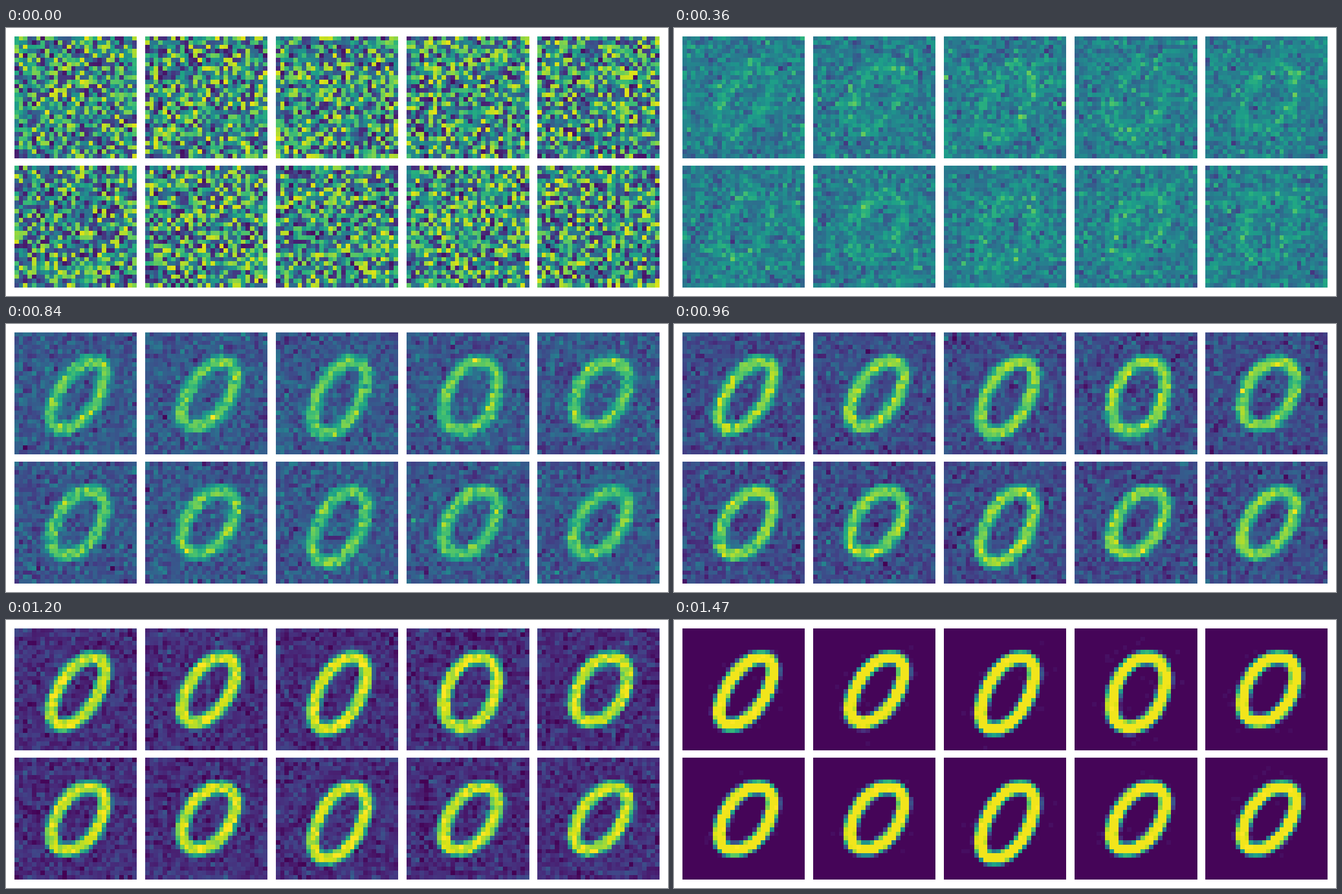
Write a matplotlib script that moves like this. It is 1175 px wide and 477 px high and loops after 1500 ms.

```python
import numpy as np
import matplotlib.pyplot as plt
from matplotlib.animation import FuncAnimation

WIDTH, HEIGHT, DPI = 1175, 477, 64
FRAMES, INTERVAL = 50, 30
COLS, ROWS, CELLS = 5, 2, 28
LEFT, TOP, PANEL = 15, 15, 217
STEP_X, STEP_Y = 232, 230
KEEP = 0.86  # share of the noise that survives one step

# Each zero is a leaning oval: (lean, lowest row), in cells.
ZEROS = [
    (3.5, 22.2), (3.2, 21.6), (3.1, 23.1), (2.0, 22.7), (2.3, 21.4),
    (2.7, 21.3), (2.6, 21.0), (3.0, 23.1), (2.8, 21.2), (3.0, 21.1),
]
CENTRE_X, HIGHEST, REACH = 14.6, 6.8, 6.0
HALF_STROKE = 1.5


def smoothstep(t):
    return t * t * (3 - 2 * t)


def oval(lean, lowest, steps=160):
    """Centre line of a sheared, slightly squarish oval."""
    angle = np.linspace(0, 2 * np.pi, steps, endpoint=False)
    across, down = (np.sign(v) * np.abs(v) ** 0.92
                    for v in (np.cos(angle), np.sin(angle)))
    half_width = np.sqrt(REACH**2 - lean**2)
    half_height = (lowest - HIGHEST) / 2
    x = CENTRE_X + half_width * across - lean * down
    y = HIGHEST + half_height * (1 + down)
    return x, y


def distance(lean, lowest):
    """Distance of every cell centre from the oval."""
    row, col = np.mgrid[:CELLS, :CELLS] + 0.5
    x, y = oval(lean, lowest)
    return np.hypot(col[..., None] - x, row[..., None] - y).min(axis=-1)


def make_noise(rng, shape):
    """Uniform start that fades into slowly changing Gaussian noise."""
    start = rng.uniform(-0.46, 0.46, shape)
    drift = np.zeros(shape)
    steps = []
    for i in range(FRAMES):
        spread = 0.08 * np.sqrt(1.02 - (i / (FRAMES - 1)) ** 4)
        steps.append(start * KEEP**i + spread * drift)
        drift = KEEP * drift + np.sqrt(1 - KEEP**2) * rng.standard_normal(shape)
    # The last step is clean apart from a few specks near the stroke.
    last = np.abs(steps[-1])
    steps[-1] = np.where((last > 0.022) & (dist < 5), last, 0)
    return steps


dist = np.array([distance(*zero) for zero in ZEROS])
noise = make_noise(np.random.default_rng(7), dist.shape)


def cells(i):
    u = i / (FRAMES - 1)
    ground = 0.012 + 0.488 * (1 - u**1.35)
    stroke = 0.5 + 0.48 * smoothstep(u**1.2)
    soft = 2.4 - 1.3 * u
    ring = np.clip(0.5 + (HALF_STROKE - dist) / soft, 0, 1)
    return np.clip(ground + (stroke - ground) * ring + noise[i], 0, 1)


fig = plt.figure(figsize=(WIDTH / DPI, HEIGHT / DPI), dpi=DPI, facecolor="white")
images = []
for k in range(COLS * ROWS):
    row, col = divmod(k, COLS)
    x, y = LEFT + col * STEP_X, TOP + row * STEP_Y
    ax = fig.add_axes([x / WIDTH, 1 - (y + PANEL) / HEIGHT,
                       PANEL / WIDTH, PANEL / HEIGHT])
    ax.axis("off")
    images.append(ax.imshow(np.zeros((CELLS, CELLS)), cmap="viridis", vmin=0,
                            vmax=1, interpolation="nearest", aspect="auto"))


def update(i):
    for image, data in zip(images, cells(i)):
        image.set_data(data)
    return images


anim = FuncAnimation(fig, update, frames=FRAMES, interval=INTERVAL,
                     repeat=True, repeat_delay=0)
plt.show()
```
